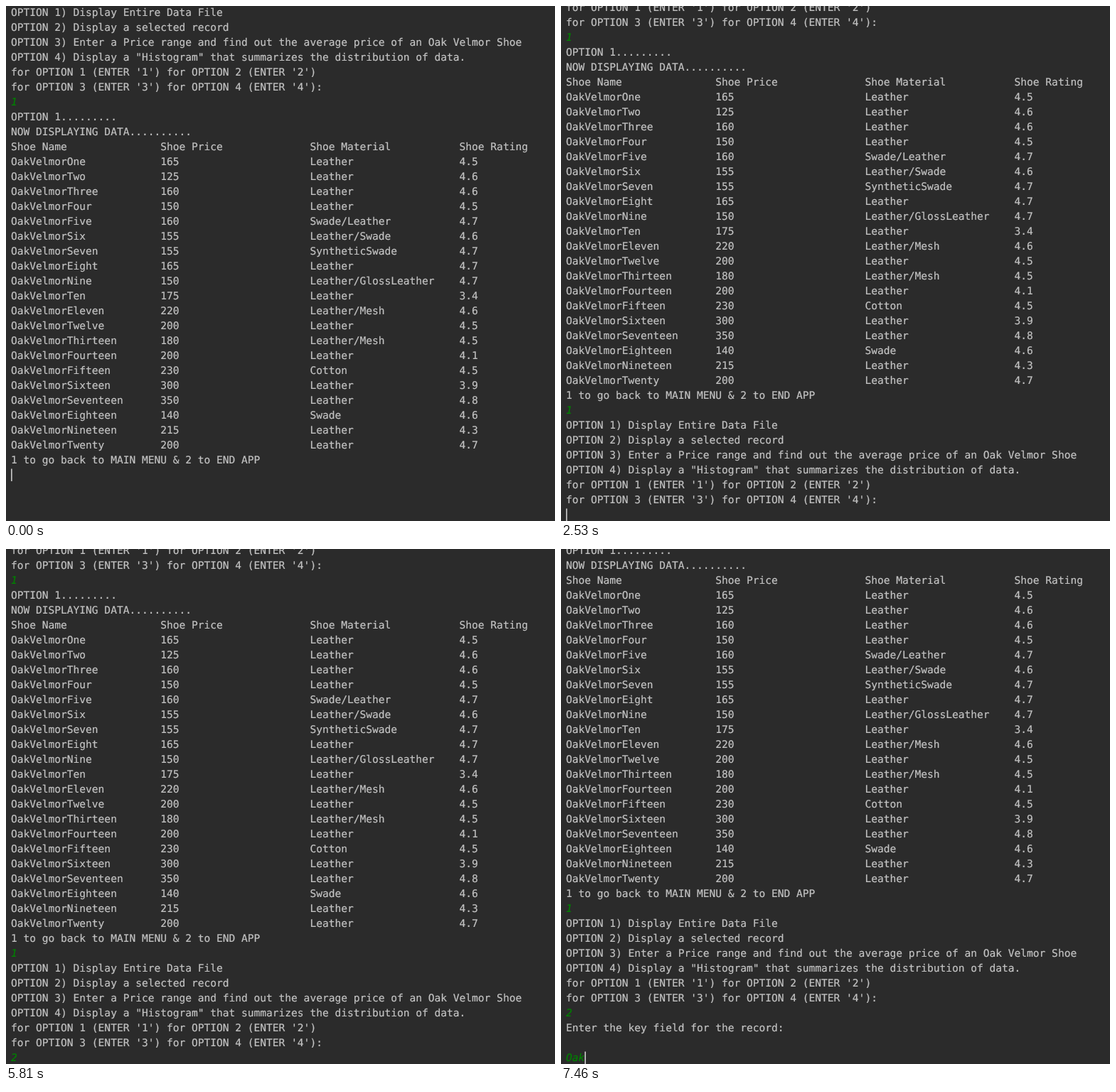
An HTML page that plays this animation: 772 by 725 pixels, repeating every 8000 ms.

```html
<!DOCTYPE html>
<html lang="en">
<head>
<meta charset="utf-8">
<title>Shoe console</title>
<style>
  html, body { margin: 0; width: 100%; height: 100%; overflow: hidden; background: #2b2b2b; }
  svg { display: block; }
  text {
    font: 14.56px "DejaVu Sans Mono", "Liberation Mono", monospace;
    fill: #c3c3c3;
    stroke: #c3c3c3;
    stroke-width: 0.2px;
    white-space: pre;
    text-rendering: geometricPrecision;
  }
  .input { fill: #008200; stroke: #008200; font-style: italic; }
  #caret { fill: #c3c3c3; }
</style>
</head>
<body>
<svg width="772" height="725">
  <g id="page"><g id="lines"></g><rect id="caret" width="1.7" height="17.5"/></g>
</svg>
<script>
const LEFT = 7, ROW = 21, CHAR = 8.765, HEIGHT = 725;
const LOOP = 8000, TICK = 149;

const menu = `OPTION 1) Display Entire Data File
OPTION 2) Display a selected record
OPTION 3) Enter a Price range and find out the average price of an Oak Velmor Shoe
OPTION 4) Display a "Histogram" that summarizes the distribution of data.
for OPTION 1 (ENTER '1') for OPTION 2 (ENTER '2')
for OPTION 3 (ENTER '3') for OPTION 4 (ENTER '4'):
`;

const shoes = `One 165 Leather 4.5
Two 125 Leather 4.6
Three 160 Leather 4.6
Four 150 Leather 4.5
Five 160 Swade/Leather 4.7
Six 155 Leather/Swade 4.6
Seven 155 SyntheticSwade 4.7
Eight 165 Leather 4.7
Nine 150 Leather/GlossLeather 4.7
Ten 175 Leather 3.4
Eleven 220 Leather/Mesh 4.6
Twelve 200 Leather 4.5
Thirteen 180 Leather/Mesh 4.5
Fourteen 200 Leather 4.1
Fifteen 230 Cotton 4.5
Sixteen 300 Leather 3.9
Seventeen 350 Leather 4.8
Eighteen 140 Swade 4.6
Nineteen 215 Leather 4.3
Twenty 200 Leather 4.7`.split("\n").map(line => ("OakVelmor" + line).split(" "));

const columns = cells => cells.map(cell => cell.padEnd(24)).join("").trimEnd() + "\n";

const table = [["Shoe Name", "Shoe Price", "Shoe Material", "Shoe Rating"], ...shoes];

// [tick, text added to the console]
const events = [
  [-3, menu + "1\nOPTION 1.........\nNOW DISPLAYING DATA..........\n" +
    table.map(columns).join("") + "1 to go back to MAIN MENU & 2 to END APP\n"],
  [14, "1"], [15, "\n"], [17, menu],
  [34, "2"], [40, "\n"], [41, "Enter the key field for the record:\n\n"],
  [47, "O"], [49, "a"], [50, "k"]
];

const page = document.getElementById("page");
const lines = document.getElementById("lines");
const caret = document.getElementById("caret");

// Only typed answers are this short.
const isInput = line => line.length < 4;

function addLine(line, row) {
  const text = document.createElementNS("http://www.w3.org/2000/svg", "text");
  text.setAttribute("x", LEFT);
  text.setAttribute("y", 14 + row * ROW);
  if (isInput(line)) text.setAttribute("class", "input");
  text.textContent = line;
  lines.append(text);
}

function showConsole(output) {
  const rows = output.split("\n");
  const last = rows.length - 1;
  lines.replaceChildren();
  rows.forEach(addLine);
  caret.setAttribute("x", LEFT + rows[last].length * CHAR);
  caret.setAttribute("y", last * ROW + 0.5);
  const scroll = Math.max(0, last * ROW + 18 - HEIGHT);
  page.setAttribute("transform", `translate(0 ${-scroll})`);
}

// The caret stays lit after each event, then toggles every 10/3 ticks.
const caretVisible = age => Math.max(0, Math.floor((age * 3 - 5) / 10)) % 2 === 0;

let shownCount = 0;
function draw(time) {
  const tick = Math.floor((time % LOOP + 8) / TICK);
  const past = events.filter(([start]) => start <= tick);
  if (past.length !== shownCount) {
    shownCount = past.length;
    showConsole(past.map(([, text]) => text).join(""));
  }
  caret.setAttribute("opacity", caretVisible(tick - past.at(-1)[0]) ? 1 : 0);
}

const begin = performance.now();
function loop() {
  draw(performance.now() - begin);
  requestAnimationFrame(loop);
}
loop();
</script>
</body>
</html>
```
